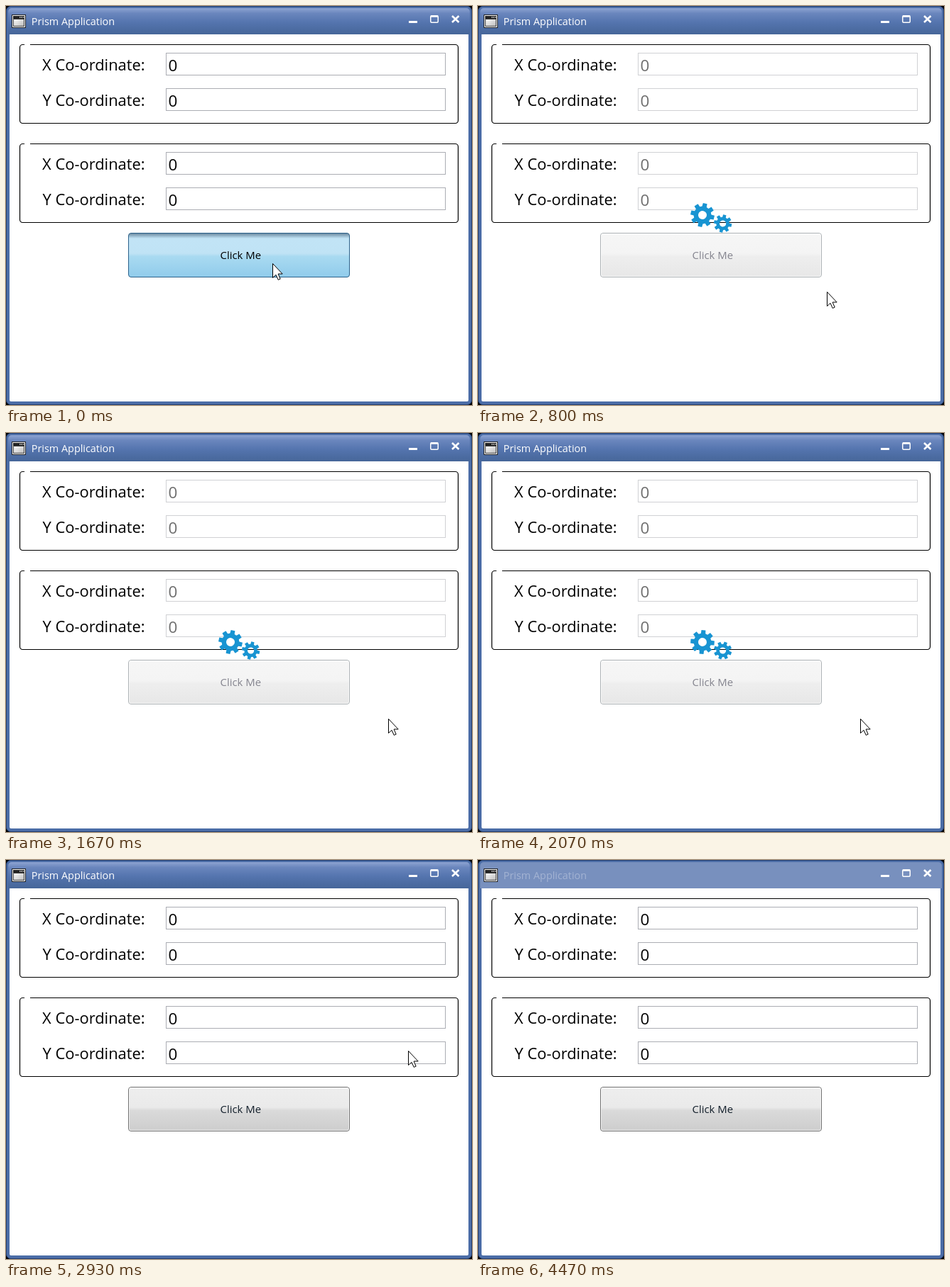
Animation of 656x563 px, one loop 4870 ms. Source, as an HTML page:

```html
<!DOCTYPE html>
<html lang="en">
<head>
<meta charset="utf-8">
<title>Prism Application</title>
<style>
  html, body { margin: 0; width: 100%; height: 100%; overflow: hidden; background: #000; }
  svg { display: block; width: 656px; height: 563px; font-family: "Open Sans", "Noto Sans", sans-serif; }
  .label, .value { font-size: 21.9px; }
  .value { font-size: 22.4px; }
  .label { text-anchor: end; }
  .box { fill: #fff; stroke: #abadb3; }
  .group { fill: none; stroke: #000; stroke-width: 1.2; }
  .caption { font-size: 14.4px; fill: #fff; }
  .click { font-size: 14.9px; text-anchor: middle; fill: #14202c; }
  .face { fill: url(#normal); stroke: #707070; }
  .rim { fill: none; stroke: #fff; stroke-opacity: .7; }
  .shade, .gears { visibility: hidden; }
  .gears { fill: #1894d2; fill-rule: evenodd; }

  .pressed .face { fill: url(#pressed); stroke: #2c628b; }
  .pressed .rim { visibility: hidden; }
  .pressed .shade { visibility: visible; }
  .pressed .click { fill: #000; }

  .busy .gears { visibility: visible; }
  .busy .face { fill: url(#disabled); stroke: #adb2b5; }
  .busy .click { fill: #85858f; }
  .busy .box { stroke: #d0d1d4; }
  .busy .value { fill: #6d6d6d; }

  .inactive .bar { fill: #7890be; }
  .inactive .caption { fill: #a3b3d3; }
</style>
</head>
<body>
<svg id="app" viewBox="0 0 656 563">
  <defs>
    <linearGradient id="title" x2="0" y2="1">
      <stop offset="0" stop-color="#8ea4d2"/>
      <stop offset=".2" stop-color="#6a86bd"/>
      <stop offset=".55" stop-color="#5474ae"/>
      <stop offset="1" stop-color="#466699"/>
    </linearGradient>
    <linearGradient id="normal" x2="0" y2="1">
      <stop offset="0" stop-color="#eee"/>
      <stop offset=".46" stop-color="#eaeaea"/>
      <stop offset=".53" stop-color="#dadada"/>
      <stop offset="1" stop-color="#cdcdcd"/>
    </linearGradient>
    <linearGradient id="pressed" x2="0" y2="1">
      <stop offset="0" stop-color="#c2e4f6"/>
      <stop offset=".46" stop-color="#c0e3f5"/>
      <stop offset=".53" stop-color="#a9daf1"/>
      <stop offset="1" stop-color="#90cbeb"/>
    </linearGradient>
    <linearGradient id="disabled" x2="0" y2="1">
      <stop offset="0" stop-color="#f6f6f6"/>
      <stop offset=".46" stop-color="#f4f4f4"/>
      <stop offset=".53" stop-color="#eee"/>
      <stop offset="1" stop-color="#e7e7e7"/>
    </linearGradient>
    <linearGradient id="shadow" x2="0" y2="1">
      <stop offset="0" stop-color="#34506a" stop-opacity=".6"/>
      <stop offset="1" stop-color="#34506a" stop-opacity="0"/>
    </linearGradient>
    <linearGradient id="pane" x2="1" y2="1">
      <stop offset="0" stop-color="#fff"/>
      <stop offset="1" stop-color="#b9b9b9"/>
    </linearGradient>
  </defs>

  <rect width="656" height="563"/>
  <rect x=".5" y=".5" width="655" height="562" rx="6" fill="#4c6ea8" stroke="#223d6e"/>
  <path class="bar" d="M3 40V8a5 5 0 0 1 5-5H648a5 5 0 0 1 5 5V40Z" fill="url(#title)"/>
  <path d="M5 40H651V556a2 2 0 0 1-2 2H7a2 2 0 0 1-2-2Z" fill="#fff"/>

  <rect x="8.5" y="12.5" width="19" height="18" fill="#fff" stroke="#222"/>
  <rect x="10" y="14" width="16" height="4" fill="#222"/>
  <path d="M19 16h1.5m1 0h1.5m1 0h1.5" stroke="#ddd" stroke-width="1.5"/>
  <rect x="10.5" y="18.5" width="15" height="10" fill="url(#pane)" stroke="#444"/>
  <text class="caption" x="35.8" y="27">Prism Application</text>
  <g fill="none" stroke="#fff">
    <path d="M567 22.5h12" stroke-width="3"/>
    <rect x="597.75" y="13.75" width="10.5" height="9.5" rx="1.5" stroke-width="1.5"/>
    <path d="M598 14.5h10" stroke-width="2.5"/>
    <path d="M628 14l9.5 9m0-9l-9.5 9" stroke-width="2.6"/>
  </g>

  <g id="form"></g>

  <rect class="face" x="172.5" y="320.5" width="311" height="62" rx="3.5"/>
  <rect class="rim" x="173.5" y="321.5" width="309" height="60" rx="2.5"/>
  <rect class="shade" x="173" y="321" width="310" height="7" rx="2" fill="url(#shadow)"/>
  <text class="click" x="330.3" y="357">Click Me</text>

  <g class="gears">
    <path id="big"/>
    <path id="small"/>
  </g>
  <path id="cursor" d="M.5 .5V20.5L5 16.3 8.2 23.4 11.2 22.1 8.1 15H14.2Z" fill="#fff" stroke="#000"/>
</svg>
<script>
  const $ = id => document.getElementById(id);
  const LOOP = 4870, STEP = 1000 / 15;

  // Pointer stops: [tick, x, y]
  const PATH = [
    [2, 375, 363], [6, 415, 388], [9, 462, 403], [17, 538, 403], [43, 538, 403],
    [44, 566, 269], [45, 606, 150], [46, 644, 62], [47, 560, 96], [48, 440, 178],
    [50, 200, 350], [51, 98, 431], [52, 16, 496]
  ];

  const row = (name, y) => `
    <text class="label" x="195.6" y="${y + 25}">${name} Co-ordinate:</text>
    <rect class="box" x="225.5" y="${y + .5}" width="393" height="31"/>
    <text class="value" x="228.6" y="${y + 26}">0</text>`;

  const group = y => `
    <path class="group" d="M26 ${y + .5}H23.5a4 4 0 0 0-4 4V${y + 107.5}a4 4 0 0 0 4 4H632.5
      a4 4 0 0 0 4-4V${y + 4.5}a4 4 0 0 0-4-4H34"/>` + row("X", y + 12) + row("Y", y + 62);

  function gear(outer, body, hole) {
    const points = [];
    for (let i = 0; i < 8; i++) {
      for (const [r, off] of [[body, -15], [outer, -10], [outer, 10], [body, 15]]) {
        const a = (i * 45 + off) * Math.PI / 180;
        points.push((r * Math.sin(a)).toFixed(2) + " " + (-r * Math.cos(a)).toFixed(2));
      }
    }
    return `M${points.join("L")}ZM${-hole} 0a${hole} ${hole} 0 1 0 ${2 * hole} 0a${hole} ${hole} 0 1 0 ${-2 * hole} 0Z`;
  }

  function pointer(tick) {
    if (tick <= PATH[0][0]) return PATH[0].slice(1);
    const i = PATH.findIndex(p => p[0] >= tick);
    const [t0, x0, y0] = PATH[i - 1], [t1, x1, y1] = PATH[i];
    const k = (tick - t0) / (t1 - t0);
    return [Math.round(x0 + (x1 - x0) * k), Math.round(y0 + (y1 - y0) * k)];
  }

  function state(tick) {
    if (tick < 2) return "pressed";
    if (tick < 32) return "busy";
    return tick < 67 ? "" : "inactive";
  }

  function draw(ms) {
    const tick = Math.floor((ms + 3.4) / STEP);
    $("app").setAttribute("class", state(tick));

    const turn = (tick - 6) * STEP * .207;
    $("big").setAttribute("transform", `translate(316 295) rotate(${20 + turn})`);
    $("small").setAttribute("transform", `translate(344.6 307) rotate(${5 - turn})`);

    const shown = tick < 53;
    $("cursor").setAttribute("visibility", shown ? "visible" : "hidden");
    if (shown) $("cursor").setAttribute("transform", `translate(${pointer(tick)})`);
  }

  $("form").innerHTML = group(54) + group(194);
  $("big").setAttribute("d", gear(17, 12.4, 6));
  $("small").setAttribute("d", gear(12.8, 9.2, 4.6));

  const start = performance.now();
  function loop() {
    draw((performance.now() - start) % LOOP);
    requestAnimationFrame(loop);
  }
  loop();
</script>
</body>
</html>
```
